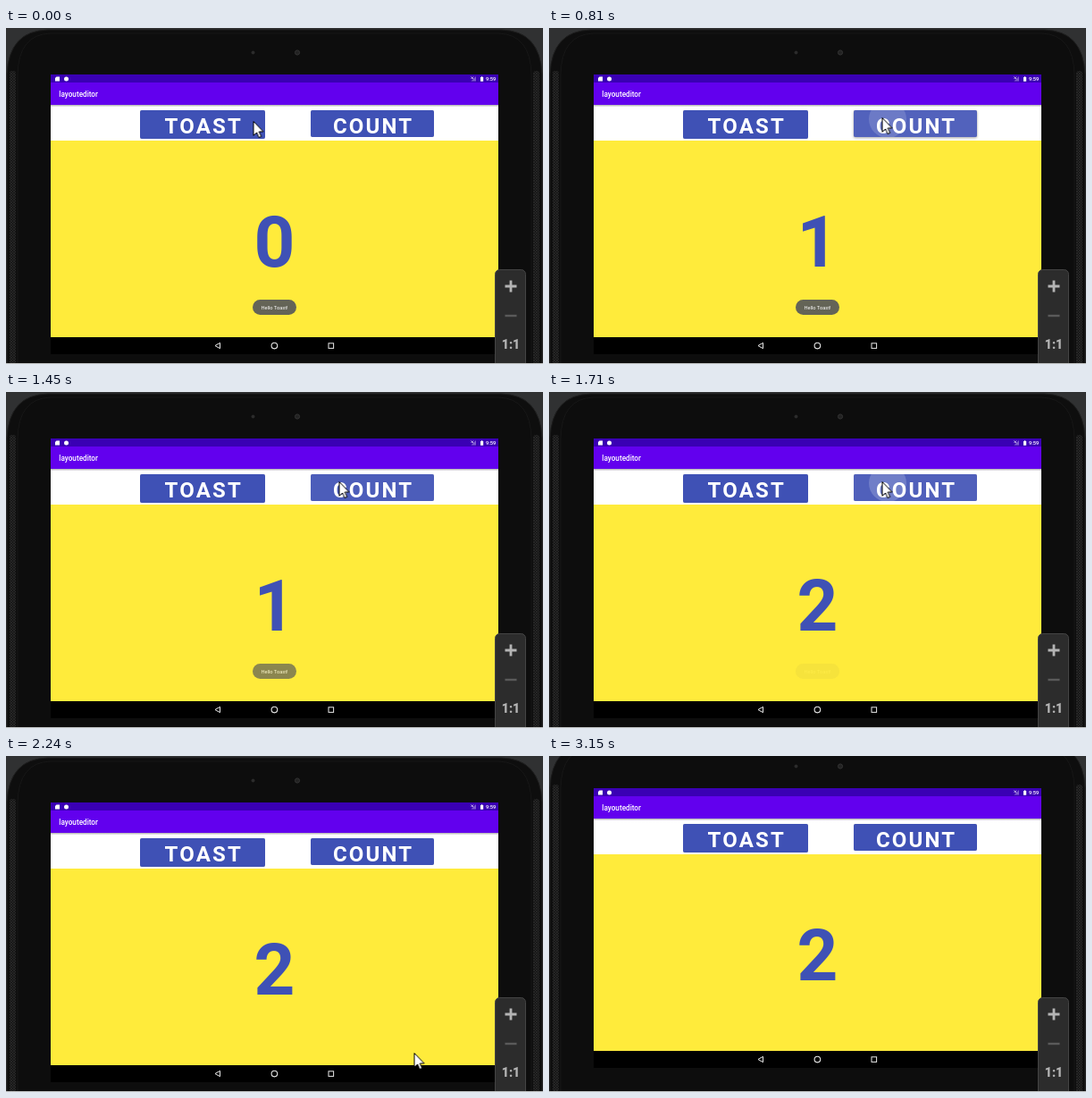
An HTML page for the animation above (3960 ms loop, 601x376 px).

```html
<!DOCTYPE html>
<html lang="en">
<head>
<meta charset="utf-8">
<title>Counter app on a tablet</title>
<style>
  html, body { margin: 0; width: 100%; height: 100%; overflow: hidden; background: #303132; }
  svg { display: block; width: 601px; height: 376px; }
  text { font-family: Roboto, sans-serif; fill: #fff; }

  .anim { animation: 3960ms step-end infinite; }
  #tablet { animation-name: scroll; }
  #cursor { animation-name: move; }
  #toast { animation-name: toast; }
  #glow { animation-name: glow; }
  #ripple { animation-name: ripple; transform-origin: 379px 102px; }
  #count { animation-name: lift; }
  #zero { animation-name: zero; }
  #one { animation-name: one; }
  #two { animation-name: two; }

  .button { fill: #3f51b5; filter: drop-shadow(0 .4px .4px rgba(0, 0, 0, .3)); }
  .label { font-size: 24px; font-weight: 700; letter-spacing: 2.14px; }
  .digit { font-size: 80px; font-weight: 700; text-anchor: middle; fill: #3f51b5; }

  @keyframes scroll {
    0% { transform: none; }
    79.54%, 100% { transform: translateY(-16px); }
  }
  @keyframes move {
    0% { transform: translate(276.5px, 104px); }
    3.03% { transform: translate(341px, 100px); }
    6.06% { transform: translate(372.5px, 99px); }
    9.84% { transform: translate(372.5px, 100px); }
    49.74% { transform: translate(382px, 124px); }
    52.77% { transform: translate(430.5px, 216px); }
    56.56% { transform: translate(456.5px, 332px); }
    59.59% { transform: translate(486.5px, 361px); }
    63.38% { transform: translate(530px, 366px); }
    66.41% { transform: translate(572px, 371px); }
    69.44%, 100% { transform: translate(620px, 390px); }
  }
  @keyframes toast {
    0% { opacity: 1; }
    36.61% { opacity: .75; }
    40.15% { opacity: .4; }
    43.18% { opacity: .06; }
    46.21%, 100% { opacity: 0; }
  }
  @keyframes glow {
    0% { opacity: 0; }
    13.63% { opacity: .05; }
    16.66% { opacity: .08; }
    20.45% { opacity: .1; }
    23.48% { opacity: .08; }
    26.76% { opacity: .05; }
    36.61% { opacity: .07; }
    40.15%, 43.18% { opacity: .09; }
    46.21% { opacity: .07; }
    49.74% { opacity: .03; }
    52.77%, 100% { opacity: 0; }
  }
  @keyframes ripple {
    0% { opacity: 0; transform: scale(.6); }
    20.45% { opacity: .16; transform: scale(1); }
    23.48% { opacity: .08; transform: scale(2.2); }
    26.76% { opacity: 0; transform: scale(.6); }
    40.15% { opacity: .12; transform: scale(.6); }
    43.18% { opacity: .19; transform: scale(1); }
    46.21% { opacity: .08; transform: scale(2.2); }
    49.74%, 100% { opacity: 0; transform: scale(.6); }
  }
  @keyframes lift {
    0% { filter: none; }
    13.63% { filter: drop-shadow(0 .7px .8px rgba(0, 0, 0, .25)); }
    16.66%, 20.45% { filter: drop-shadow(0 1px 1.5px rgba(0, 0, 0, .35)); }
    23.48% { filter: drop-shadow(0 .7px .8px rgba(0, 0, 0, .25)); }
    26.76% { filter: none; }
    40.15% { filter: drop-shadow(0 .6px .7px rgba(0, 0, 0, .25)); }
    43.18%, 100% { filter: none; }
  }
  @keyframes zero { 0% { opacity: 1; } 20.45%, 100% { opacity: 0; } }
  @keyframes one { 0% { opacity: 0; } 20.45% { opacity: 1; } 40.15%, 100% { opacity: 0; } }
  @keyframes two { 0% { opacity: 0; } 40.15%, 100% { opacity: 1; } }
</style>
</head>
<body>
<svg viewBox="0 0 601 376">
  <defs>
    <pattern id="mesh" width="3" height="3" patternUnits="userSpaceOnUse">
      <rect width="3" height="3" fill="#151515"/>
      <path d="M0 0L3 3M3 0L0 3" stroke="#303030" stroke-width=".6"/>
    </pattern>
    <linearGradient id="shade" x2="0" y2="1">
      <stop stop-color="#000" stop-opacity=".32"/>
      <stop offset="1" stop-color="#000" stop-opacity="0"/>
    </linearGradient>
    <clipPath id="countClip"><rect x="341" y="92" width="138" height="30" rx="2"/></clipPath>
  </defs>

  <rect width="601" height="376" fill="#303132"/>

  <g id="tablet" class="anim">
    <path d="M1 420V52Q3 3 47 2H554Q598 3 600 52V420Z" fill="#0e0e0e" stroke="#1f1f1f"/>
    <path d="M13 420V52Q14 7 50 6H551Q587 7 588 52V420" fill="#0d0d0d" stroke="#171717"/>
    <rect x="4" y="48" width="7" height="350" rx="3" fill="url(#mesh)"/>
    <rect x="590" y="48" width="7" height="350" rx="3" fill="url(#mesh)"/>
    <circle cx="276.5" cy="27.5" r="2" fill="#2b2b2b"/>
    <circle cx="326" cy="27.5" r="2.6" fill="#222" stroke="#333"/>

    <!-- Screen -->
    <rect x="50" y="126" width="501" height="220" fill="#ffeb3b"/>
    <rect x="50" y="86" width="501" height="40" fill="#fff"/>
    <rect x="50" y="86" width="501" height="2.5" fill="url(#shade)"/>
    <rect x="50" y="61" width="501" height="25" fill="#6200ee"/>
    <rect x="50" y="52" width="501" height="9" fill="#3a00b4"/>
    <rect x="50" y="346" width="501" height="19" fill="#000"/>

    <!-- Status bar -->
    <path d="M56.5 54.5H60V59.5H55V56Z" fill="#fff"/>
    <circle cx="67.5" cy="57" r="2.5" fill="#fff"/>
    <path d="M520.5 59.5L526 54V59.5Z" fill="#fff" fill-opacity=".35"/>
    <path d="M520.5 54.5L523 57M523 54.5L520.5 57" stroke="#fff" stroke-width=".7"/>
    <path d="M531 55H532V54.2H533.2V55H534.2V59.7H531Z" fill="#fff"/>
    <text x="537" y="59.1" font-size="5.7" font-weight="500">9:59</text>
    <text x="59.3" y="76.6" font-size="8.2" font-weight="500">layouteditor</text>

    <rect class="button" x="150" y="92" width="140" height="32" rx="2"/>
    <text class="label" x="177.6" y="118.3">TOAST</text>

    <g id="count" class="anim">
      <rect class="button" x="341" y="92" width="138" height="30" rx="2"/>
    </g>
    <g clip-path="url(#countClip)" fill="#fff">
      <rect id="glow" class="anim" x="341" y="92" width="138" height="30"/>
      <circle id="ripple" class="anim" cx="379" cy="102" r="21"/>
    </g>
    <text class="label" x="366" y="118.3">COUNT</text>

    <text id="zero" class="digit anim" x="300.5" y="267">0</text>
    <text id="one" class="digit anim" x="300.5" y="267">1</text>
    <text id="two" class="digit anim" x="300.5" y="267">2</text>

    <g id="toast" class="anim">
      <rect x="276" y="304" width="49" height="17" rx="8.5" fill="#646457"/>
      <text x="300.5" y="314.8" font-size="5.7" text-anchor="middle">Hello Toast!</text>
    </g>

    <!-- Navigation bar -->
    <g fill="none" stroke="#e8e8e8">
      <path d="M239.5 352.3V358.7L234 355.5Z"/>
      <circle cx="300.4" cy="355.6" r="3.3" stroke-width="1.1"/>
      <rect x="361" y="352.8" width="5.6" height="5.6"/>
    </g>
  </g>

  <!-- Zoom panel -->
  <rect x="547.5" y="270.5" width="34" height="120" rx="5" fill="#2c2c2c" stroke="#444"/>
  <path d="M558.5 289H571.5M565 282.5V295.5" stroke="#b4b4b4" stroke-width="2.8"/>
  <path d="M558.5 322H571.5" stroke="#5a5a5a" stroke-width="2.4"/>
  <text x="565" y="359" font-size="14" font-weight="900" text-anchor="middle" style="fill:#b4b4b4">1:1</text>
  <rect y="375" width="601" height="1" fill="#bfc1c1"/>

  <path id="cursor" class="anim" d="M.5 .5V16.3L4.1 13L6.6 18.6L9.2 17.4L6.7 12H11.5Z" fill="#fff" stroke="#000" stroke-width="1"/>
</svg>
</body>
</html>
```
